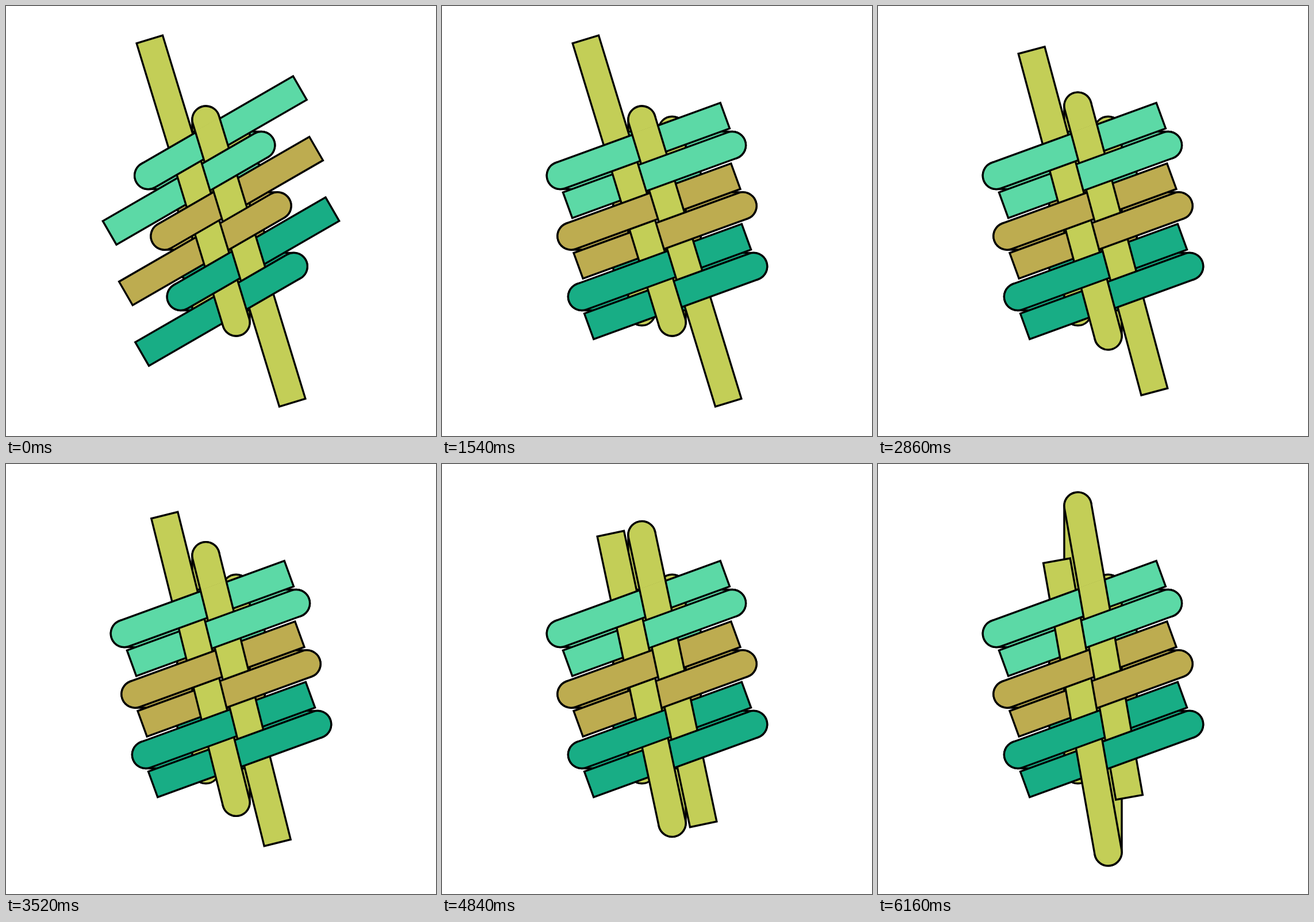
An HTML page with a canvas for the animation above (8.16 s loop, 748 px wide and 748 px high).

```html
<!DOCTYPE html>
<html>
<head>
<meta charset="utf-8">
<title>Folded weave</title>
<style>
html, body { margin: 0; height: 100%; overflow: hidden; background: #fff; }
canvas { display: block; }
</style>
</head>
<body>
<canvas id="stage" width="748" height="748"></canvas>
<script>
const ctx = document.getElementById('stage').getContext('2d');
const GAP = 52.7, WIDTH = 47.4, LINE = 3.4;
const ROW_LENGTH = 304.7, COLUMN_LENGTH = 514.8;
const OLIVE = '#c3ce57', ROWS = ['#5cd9a6', '#bdac50', '#18ad85'];
const { PI, tan } = Math;
const rad = deg => deg * PI / 180;

const strip = (x, y, angle, length, color, round) => ({ x, y, angle, length, color, round });

// The strip starts with a round cap at x, y and runs along its angle.
function outline(s, grow = 0) {
  const r = WIDTH / 2 + grow;
  ctx.translate(s.x, s.y);
  ctx.rotate(s.angle);
  ctx.beginPath();
  ctx.arc(0, 0, r, PI / 2, PI * 3 / 2);
  if (s.round) {
    ctx.arc(s.length, 0, r, -PI / 2, PI / 2);
  } else {
    ctx.lineTo(s.length + grow, -r);
    ctx.lineTo(s.length + grow, r);
  }
  ctx.closePath();
}

function draw(s) {
  ctx.save();
  outline(s);
  ctx.fillStyle = s.color;
  ctx.fill();
  ctx.stroke();
  ctx.restore();
}

function drawInside(s, mask) {
  ctx.save();
  const base = ctx.getTransform();
  outline(mask, LINE / 2 + 0.5);
  ctx.clip();
  ctx.setTransform(base);
  draw(s);
  ctx.restore();
}

// Each group lies over the one before, and the first also over the last.
function weave(first, second, third, last) {
  [first, second, third, last].flat().forEach(draw);
  for (const s of first) for (const mask of last) drawInside(s, mask);
}

function render(rowAngle, columnAngle) {
  const a = rad(rowAngle), c = rad(columnAngle), half = GAP / 2;
  const capX = half / tan(a / 2), capY = half / tan(c / 2);
  const left = [], right = [], leftBack = [], rightBack = [];

  ROWS.forEach((color, n) => {
    const y = (n - 1) * 2 * GAP, x = y * tan(a / 2);
    const lx = x - capX, rx = x + capX;
    left.push(strip(lx, y + half, -a, ROW_LENGTH, color));
    right.push(strip(rx, y - half, PI - a, ROW_LENGTH, color));
    leftBack.push(strip(lx, y + half, 0, GAP - lx, color, true));
    rightBack.push(strip(rx, y - half, PI, GAP + rx, color, true));
  });

  const backLength = capY + 3 * GAP;
  const top = [strip(-half, -capY, PI / 2 - c, COLUMN_LENGTH, OLIVE)];
  const bottom = [strip(half, capY, -PI / 2 - c, COLUMN_LENGTH, OLIVE)];
  const topBack = [strip(-half, -capY, PI / 2, backLength, OLIVE, true)];
  const bottomBack = [strip(half, capY, -PI / 2, backLength, OLIVE, true)];

  ctx.setTransform(1, 0, 0, 1, 0, 0);
  ctx.fillStyle = '#fff';
  ctx.fillRect(0, 0, 748, 748);
  ctx.translate(374, 374);
  ctx.lineWidth = LINE;
  ctx.strokeStyle = '#000';
  // On the back the last group lies under the first, as on the front.
  weave(bottomBack, leftBack, topBack, rightBack);
  weave(top, right, bottom, left);
}

let shown = -1;
function tick(now) {
  const t = now % 8160;
  const step = t < 1000 ? 0 : Math.min(87, 1 + Math.floor((t - 1000) / 60));
  if (step !== shown) {
    shown = step;
    render(30 - step % 11, 17 - Math.floor(step / 11));
  }
  requestAnimationFrame(tick);
}
tick(performance.now());
</script>
</body>
</html>
```
